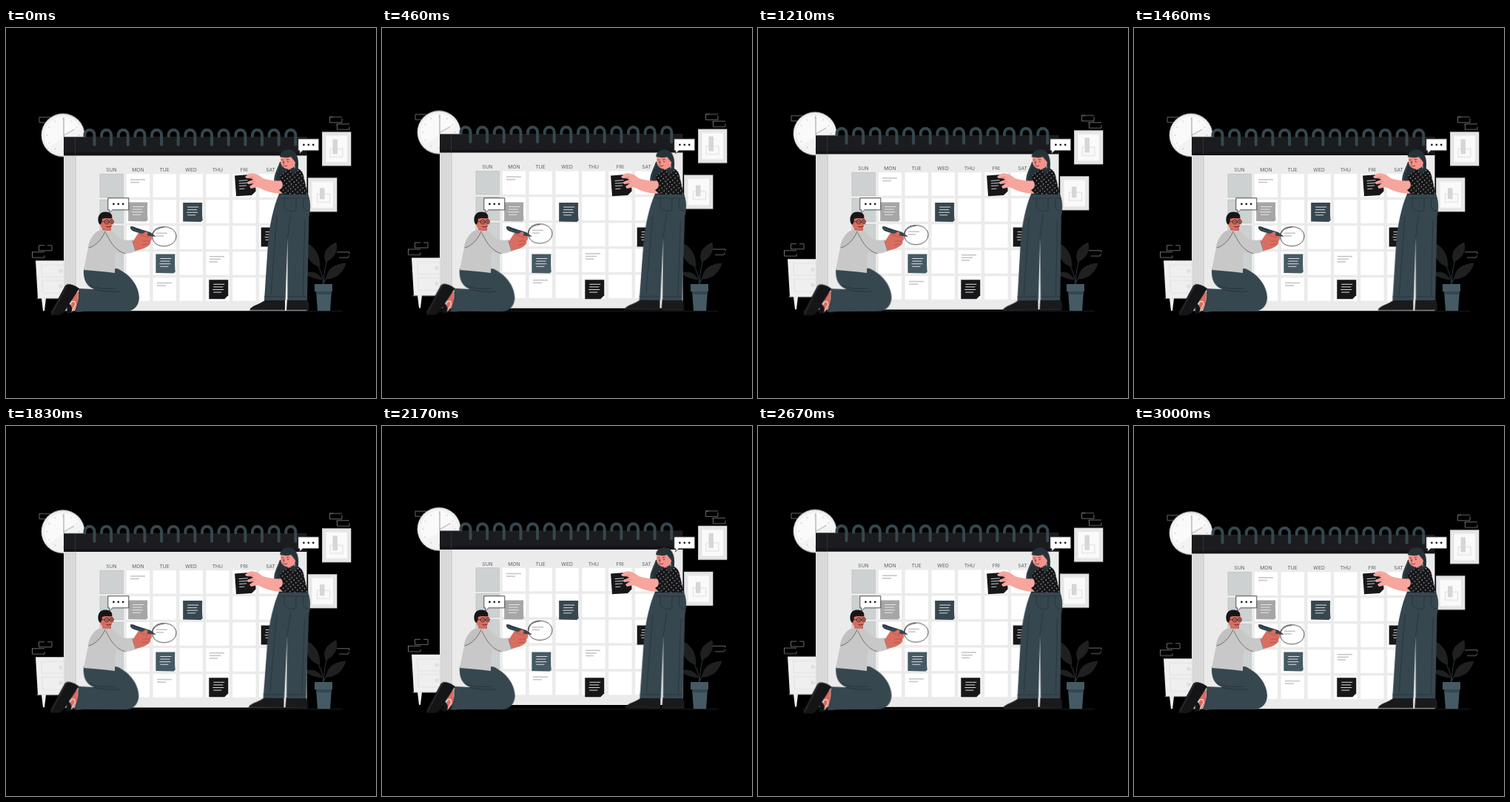
An HTML page that plays this animation: 500 px wide and 500 px high, repeating every 3.04 s.

```html
<!DOCTYPE html>
<html lang="en">
<head>
<meta charset="utf-8">
<title>Planning calendar</title>
<style>
html, body { margin: 0; width: 100%; height: 100%; overflow: hidden; background: #000; }
svg { display: block; width: 100vw; height: 100vh; }
.bob, .legs, .knees, .head { animation: 760ms cubic-bezier(.364, 0, .636, 1) infinite alternate; }
.bob { animation-name: bob; }
.legs, .knees, .head { animation-name: sway; animation-delay: -1140ms; }
.legs { --a: .6deg; transform-origin: 392px 226px; }
.knees { --a: .5deg; transform-origin: 130px 300px; }
.head { --a: .7deg; transform-origin: 384px 194px; }
@keyframes bob { from { transform: translateY(.3px); } to { transform: translateY(-5.5px); } }
@keyframes sway { from { transform: rotate(var(--a)); } to { transform: rotate(calc(-1 * var(--a))); } }
.days { font: 400 6.7px Inter, Lato, sans-serif; fill: #5c6265; text-anchor: middle; }
.line { fill: none; stroke-linecap: round; stroke-linejoin: round; }
.brick { fill: none; stroke: #858585; stroke-width: .8; }
</style>
</head>
<body>
<svg viewBox="0 0 500 500">
  <defs>
    <pattern id="dots" width="6.4" height="6.4" patternUnits="userSpaceOnUse" patternTransform="rotate(8)">
      <rect width="6.4" height="6.4" fill="#151517"/>
      <circle cx="1.6" cy="1.6" r=".62" fill="#f2f2f2"/>
      <circle cx="4.8" cy="4.8" r=".62" fill="#f2f2f2"/>
    </pattern>
    <clipPath id="face"><circle cx="77" cy="144.5" r="25"/></clipPath>
  </defs>

  <g class="bob">
    <g class="brick">
      <path d="M60 120.3H45V127.3H53"/>
      <path d="M442 120H437.5V127.5H454V122M437.5 120H454"/>
      <path d="M464 129.5H447.5V137H464V133M447 129.5V131"/>
      <path d="M52 293.5H44.5V300.5H62V293.5H56"/>
      <path d="M35.5 305V302.5H52M35.5 302V310H52V307"/>
      <path d="M447 302.5H464V305M450 310H462L464 307"/>
    </g>
    <g id="frames"></g>
    <circle cx="77" cy="144.5" r="29.3" fill="#e2e2e2"/>
    <circle cx="77" cy="144.5" r="28" fill="#f1f1f1"/>
    <circle cx="77" cy="144.5" r="25" fill="#fafafa"/>
    <path d="M54 163 104 132V172H54Z" fill="#f3f3f3" clip-path="url(#face)"/>
    <g id="ticks" stroke="#c4c4c4" stroke-width=".8"></g>
    <path class="line" d="M78 121V146M78 145 92 137" stroke="#b5b5b5" stroke-width="1.4"/>
    <path d="M40 314H80V365H54L52 382H50L48 365H43Z" fill="#efefef"/>
    <path class="line" d="M48 320H80V336H49ZM49 341H80V358H50ZM42 365H80" stroke="#dedede" stroke-width=".8"/>
    <circle cx="74" cy="328" r="2.8" fill="#e0e0e0"/>
    <circle cx="74" cy="349" r="2.8" fill="#e0e0e0"/>
  </g>

  <g id="plant">
    <path class="line" d="M429 347C428 330 420 315 411 306M429 347C430 325 433 312 441 299M429 347C431 337 441 326 451 322" stroke="#31383b" stroke-width="1"/>
    <g fill="#1f2020" stroke="#2e3132" stroke-width=".5">
      <path d="M424 322C412 320 405 309 405 291C416 294 424 305 424 322Z"/>
      <path d="M432 316C428 304 433 296 446 290C449 302 443 311 432 316Z"/>
      <path d="M433 339C434 326 443 319 459 318C455 331 446 339 433 339Z"/>
      <path d="M427 340C418 339 409 336 404 331C414 328 423 331 427 340Z"/>
    </g>
    <path d="M419 355H440L438 382.5H421Z" fill="#455a64"/>
    <path d="M419 355H440L439.6 360H419.4Z" fill="#35464e"/>
    <path d="M417 346H441V356H417Z" fill="#455a64"/>
  </g>

  <g class="bob">
    <path d="M78 170H406.500V382.300H78Z" fill="#ebebeb"/>
    <path d="M78 170H94V382.300H78Z" fill="#dcdcdc"/>
    <path d="M81 172V382M84 172V382M87 172V382M90.500 172V382" stroke="#cdcdcd" stroke-width=".6"/>
    <path d="M94 172V382" stroke="#b4b4b4" stroke-width=".7"/>
    <path d="M78 147H406.500V171.900H78Z" fill="#1b1c1f"/>
    <path d="M78 168H406.500V171.900H78Z" fill="#131316"/>
    <path d="M93.500 147V171.900" stroke="#3a3c3f" stroke-width=".7"/>
    <path d="M78 147H406.500" stroke="#333" stroke-width=".5"/>
    <g id="cells"></g>
    <g class="days" id="days"></g>
    <g id="marks" stroke="#c6c6c6" stroke-width="1.6"></g>
    <g class="line" id="rings" stroke="#37474f" stroke-width="4"></g>
  </g>
  <path d="M60 382.6H455" stroke="#1c272c" stroke-width=".8"/>

  <g id="notes"></g>

  <path class="bob line" d="M197.500 281C198 271 206 268.500 214 268.500C223 268.500 230 274 230 281C230 289 223 294.500 213 294.500C204 294.500 197 289 198 280C199 273 206 269.500 213 269" stroke="#222" stroke-width=".8"/>

  <g id="bubbles"></g>

  <g id="man">
    <g class="knees">
      <path d="M90 362 98 356 97 374 90 383H86Z" fill="#d96d60"/>
      <path d="M86 373C91 367 94 369 94 374L88 384" class="line" stroke="#eee" stroke-width="1.1"/>
      <path d="M83 372C88 373 91 379 88 385L82 386Z" fill="#141416"/>
      <path d="M105 325H150C169 333 180 350 180 365C179 377 172 383 160 383H106C100 384 95 384 92 383C97 375 99 365 98 352L119 353C109 349 104 341 105 325Z" fill="#37474f"/>
      <path class="line" d="M119 353C132 357 144 356 154 356M113 347C124 354 137 352 148 352M99 357C99 367 97 376 94 382" stroke="#222e34" stroke-width=".8"/>
      <path d="M80 348C84 344 93 347 99 352L83 377C79 384 76 388 71 388L61 388C60 385 62 380 66 374Z" fill="#151517"/>
      <path class="line" d="M83 346 62 386" stroke="#45484a" stroke-width=".7"/>
    </g>
    <path d="M129 264H142L142 277 131 278Z" fill="#c45f54"/>
    <path d="M128 273C119 276 112 287 111 297L105 327C118 328 134 329 147 331L148 302C156 306 166 306 177 301L172 286C162 288 155 286 150 281C146 275 143 273 137 274Z" fill="#c8c8c8"/>
    <path d="M128 273C118 276 112 287 111 297C119 297 127 291 135 276Z" fill="#c1c1c1"/>
    <path class="line" d="M134 275C130 285 121 295 112 297M135 277C142 292 149 301 161 305M171 288 175 301" stroke="#3d3d3d" stroke-width=".6"/>
    <path d="M128 257C129 252 142 251 144 257L145.500 265 143 266C143 272 137 275 132 272C127 269 126 263 128 257Z" fill="#d96d60"/>
    <path d="M125 263C123 254 127 248.500 134 248.500C140 248 145 252 143 257C138 258 134 256 130 258L129 264 127 266Z" fill="#161618"/>
    <g class="line" stroke="#222" stroke-width=".8">
      <circle cx="136.300" cy="262" r="2.900"/>
      <circle cx="143" cy="261.500" r="2.500"/>
      <path d="M133.500 262 128 261M136 268.500Q139 270 142 268"/>
      <path d="M136.500 261.700V262.300M143 261.200V261.800" stroke-width="1.2"/>
    </g>
    <path d="M171 289 179 277C183 272 190 273 195 278C198 282 198 286 195 288C197 293 190 296 186 298L176 301Z" fill="#d96d60"/>
    <path class="line" d="M181 279 191 283M185 288 194 288M184 293 191 292" stroke="#a44d44" stroke-width=".7"/>
    <path d="M168 270C167 267 172 268 176 270L195 276 203 282 193 281 173 275C170 274 168 272 168 270Z" fill="#37474f"/>
    <path d="M183 279 189 275C193 276 192 280 188 282Z" fill="#d96d60"/>
    <path class="line" d="M171 269 181 273" stroke="#18252a" stroke-width=".8"/>
  </g>

  <g id="woman">
    <g class="legs">
      <path d="M380 367H407C410 372 410 377 409 381.500H379Z" fill="#1a1a1c"/>
      <path d="M352 366H377V381.500H329.500C330 375 344 374 352 366Z" fill="#1a1a1c"/>
      <path d="M330 380.500H377M379 380.500H409" stroke="#34373a" stroke-width=".6"/>
      <path d="M369 224H408C412 235 412 243 409.500 255L407 368H380.500L380.500 284 377.500 368H349L354 292C356 265 362 240 369 224Z" fill="#37474f"/>
      <path class="line" d="M380.500 284 385 250M376 230V240C377 248 389 249 392 246V231M402 231C399 243 404 248 410 247M370 230H409M366 255 358 360M404 260 401 362M349 363H377M381 363H406" stroke="#222e34" stroke-width=".7"/>
    </g>
    <path d="M370 181C367 190 361 199 362.500 209L369 214 394 197 390 177Z" fill="#263238"/>
    <path class="line" d="M370 185C365 194 364 200 364 209" stroke="#455a64" stroke-width=".7"/>
    <path d="M380 184H391L392 194 382 196Z" fill="#e9877e"/>
    <path d="M383 191C387 194 391 191 393 189C400 192 402 197 403 204L408 225H369C371 220 373 214 372 208L370 201C373 196 378 193 383 191Z" fill="url(#dots)"/>
    <g transform="rotate(-4 323 212)">
      <path d="M310 198.500H337V221.500L331 226.500H310Z" fill="#17171a"/>
      <path d="M315 206H327M315 209.500H327M315 213H325M315 217H322" stroke="#ddd" stroke-width=".9"/>
    </g>
    <path d="M376 206C365 207 356 206 347 203C341 198 334 195 328 197L323 201 325 203C329 203 332 203 334 205L326 208 327 211 335 210 329 214 331 217 340 215C351 221 363 224 374 224C382 218 382 209 376 206Z" fill="#f7a69d"/>
    <path class="line" d="M327 203 335 201M330 209 337 207" stroke="#d57f77" stroke-width=".7"/>
    <path d="M370 201 380 197C389 203 389 218 374 224L369 219C375 216 375 211 372 207Z" fill="url(#dots)"/>
    <path class="line" d="M383 201C387 210 384 218 375 224" stroke="#3a3a3a" stroke-width=".6"/>
    <g class="head">
      <path d="M371 172C372 164 382 163 388 166C395 171 396 181 394.500 192L388 198 382 186Z" fill="#263238"/>
      <path d="M371 174C377 172 384 170 387 174L391 181C391 187 387 191 381 190.500C375 190 371 186 371 180Z" fill="#f4938b"/>
      <path d="M370 174C370 166 381 162 388 166L391.500 182 385 174C380 176 375 175 370 174Z" fill="#263238"/>
      <path class="line" d="M372.500 178 375 178.500M379 178 382 177.500M375 186Q378 188 380 186M376 181 375 184" stroke="#30201f" stroke-width=".7"/>
      <circle cx="374.500" cy="181" r=".8" fill="#222"/>
      <circle cx="381" cy="180.500" r=".8" fill="#222"/>
      <path class="line" d="M390 186V189" stroke="#eee" stroke-width=".8"/>
    </g>
  </g>
</svg>
<script>
const put = (id, html) => document.getElementById(id).innerHTML = html;
const repeat = (n, make) => Array.from({ length: n }, (_, i) => make(i)).join('');
const rect = (x, y, w, h, extra) => `<rect x="${x}" y="${y}" width="${w}" height="${h}" ${extra}/>`;
const colX = c => 127 + c * 35.85;

put('cells', repeat(35, i => {
  const c = i % 7, r = Math.floor(i / 7);
  const look = c ? 'fill="#fff"' : 'fill="#ced1d1" stroke="#b5b9b9" stroke-width=".6"';
  return rect(colX(c), 197 + r * 35, 31.3, 31.5, look);
}));

put('days', ['SUN', 'MON', 'TUE', 'WED', 'THU', 'FRI', 'SAT']
  .map((d, i) => `<text x="${142.5 + i * 35.85}" y="193.8">${d}</text>`).join(''));

put('rings', repeat(13, i => {
  const x = 113 + i * 22.65;
  return `<path d="M${x - 6.5} 146V144A6.5 6.5 0 0 1 ${x + 6.5} 144V157.500"/>`;
}));

// Each entry: left, top, then the line lengths
put('marks', [[168, 204.7, 20, 12], [203, 277, 15, 10], [275, 308.5, 20, 15, 11], [204, 344.3, 20, 12]]
  .map(([x, y, ...lens]) => lens.map((w, i) => `<path d="M${x} ${y + i * 3.6}h${w}"/>`).join('')).join(''));

put('ticks', repeat(12, i => `<path d="M77 121.500v3" transform="rotate(${i * 30} 77 144.5)"/>`));

const frame = (x, y, ax, ay, h) =>
  rect(x, y, 38.5, 45.5, 'fill="#e6e6e6" stroke="#f4f4f4" stroke-width=".6"') +
  rect(x + 5, y + 5, 28.5, 35.5, 'fill="#fafafa"') +
  rect(ax, ay, 6.5, h, 'fill="#d6d6d6"') +
  rect(ax - 3.5, ay + h - 7, 17, 11, 'fill="none" stroke="#d6d6d6" stroke-width=".8"');
put('frames', frame(427.5, 140.3, 441.5, 150, 20) + frame(408.5, 202.3, 424, 216, 15));

const note = (x, y, fill, cut) => {
  const shape = cut ? 'h26v21l-5 5h-21z' : 'h26q-.5 18 .5 24l-2.500 2q-13-.5-24-.5z';
  return `<path d="M${x} ${y}${shape}" fill="${fill}"/>` +
    [[6, 15], [6, 13], [5, 15], [6, 11]].map(([dx, w], i) =>
      `<path d="M${x + dx} ${y + 6 + i * 3.6}h${w}" stroke="#eee" stroke-width=".9"/>`).join('');
};
put('notes', note(165.2, 235.5, '#a6a6a6') + note(239.2, 236, '#37474f') +
  note(202.4, 305.5, '#455a64') + note(274.3, 340.3, '#17171a', true) + note(344.7, 269.5, '#17171a', true));

const bubble = (x, y) =>
  `<path d="M${x} ${y}h28v16h-22l-4 4v-4h-2z" fill="#fff" stroke="#222" stroke-width=".8"/>` +
  repeat(3, i => `<circle cx="${x + 7.6 + i * 6.4}" cy="${y + 8}" r="1.400" fill="#1a1a1a"/>`);
put('bubbles', bubble(137.8, 229.8) + bubble(394.8, 149.800));
</script>
</body>
</html>
```
